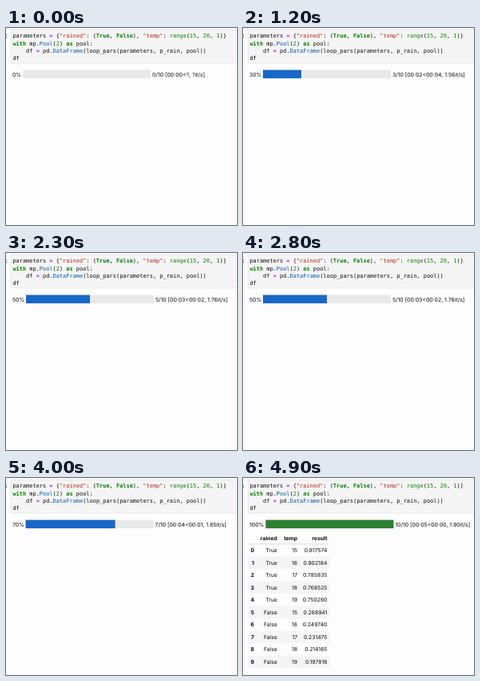
Recreate the animation shown at these times as an HTML page. Size 289 px wide and 247 px high, loop 5000 ms.

```html
<!DOCTYPE html>
<html lang="en">
<head>
<meta charset="utf-8">
<title>Parallel loop with progress bar</title>
<style>
  html, body { margin: 0; width: 100%; height: 100%; overflow: hidden; background: #fdfdfd; }
  svg { display: block; width: 100%; height: 100%; }
  text { white-space: pre; fill: #0c0c0c; text-rendering: geometricPrecision; }
  .code text { font: 6.94px "DejaVu Sans Mono", monospace; }
  .ui { font: 6.9px Inter, sans-serif; }
  .table { font: 6.8px Inter, sans-serif; }
  .b, .k { font-weight: 700; }
  .k, .n { fill: #008000; }
  .s { fill: #ba2121; }
  .p { fill: #0055aa; }
  .o { fill: #aa22ff; font-weight: 700; }
</style>
</head>
<body>
<svg id="stage" viewBox="0 0 289 247" xmlns="http://www.w3.org/2000/svg">
  <rect width="289" height="247" fill="#fdfdfd"/>
  <rect x="6.2" y="2.2" width="290" height="41.8" fill="#f5f5f5" stroke="#dedede" stroke-width=".6"/>
  <g class="code" id="code"><text x="-1.5" y="12.4">:</text></g>
  <g class="ui">
    <text id="percent" x="8" y="60.6"></text>
    <rect id="track" y="52.6" width="160" height="10.5" fill="#e9e9e9"/>
    <rect id="bar" y="52.6" height="10.5"/>
    <text id="stats" y="60.6"></text>
  </g>
  <g class="table" id="table"></g>
</svg>
<script>
const NS = "http://www.w3.org/2000/svg";
const LOOP = 5000;
const $ = id => document.getElementById(id);

function add(parent, tag, attrs, text) {
  const el = document.createElementNS(NS, tag);
  for (const key in attrs) el.setAttribute(key, attrs[key]);
  if (text !== undefined) el.textContent = text;
  return parent.appendChild(el);
}

// Code cell
const source = [
  'parameters = {"rained": (True, False), "temp": range(15, 20, 1)}',
  'with mp.Pool(2) as pool:',
  '    df = pd.DataFrame(loop_pars(parameters, p_rain, pool))',
  'df'
];
const token = /(?<s>"[^"]*")|\b(?<k>with|as|True|False)\b|\b(?<n>range|\d+)\b|(?<o>=)|(?<p>(?<=\.)\w+)|[^"=\w]+|\w+/g;

source.forEach((line, i) => {
  const row = add($("code"), "text", { x: 8.4, y: 12.4 + i * 9.15 });
  for (const m of line.matchAll(token)) {
    const kind = Object.keys(m.groups).find(key => m.groups[key]);
    add(row, "tspan", kind ? { class: kind } : {}, m[0]);
  }
});

// Result table
const results = [.817574, .802184, .785835, .768525, .750260,
                 .268941, .249740, .231475, .214165, .197816];
const COLUMNS = [14, 42.8, 68.1, 105.4];
const LEFT = 6, WIDTH = 103, ROW = 15.53, HEAD = 75.1;
const table = $("table");

function addRow(mid, cells, isBold) {
  cells.forEach((text, i) => add(table, "text", {
    x: COLUMNS[i], y: mid + 2.4, "text-anchor": "end", class: isBold(i) ? "b" : ""
  }, text));
}

add(table, "text", { x: -1.5, y: HEAD + 2.4, style: "fill:#bf5b3d" }, ":");
addRow(HEAD, ["", "rained", "temp", "result"], () => true);
results.forEach((value, i) => {
  const mid = HEAD + (i + 1) * ROW;
  if (i % 2) add(table, "rect", { x: LEFT, y: mid - ROW / 2, width: WIDTH, height: ROW, fill: "#f5f5f5" });
  addRow(mid, [i, i < 5 ? "True" : "False", 15 + i % 5, value.toFixed(6)], col => col === 0);
});
add(table, "rect", { x: LEFT, y: 82.6, width: WIDTH, height: .6, fill: "#bdbdbd" });

// Progress: start time, items done, bar position, timing text
const steps = [
  [0, 0, 21.2, "00:00<?, ?it/s"],
  [200, 1, 24.2, "00:01<00:09, 1.03s/it"],
  [1200, 3, 25, "00:02<00:04, 1.56it/s"],
  [2300, 5, 25, "00:03<00:02, 1.76it/s"],
  [3300, 7, 24.6, "00:04<00:01, 1.85it/s"],
  [4300, 10, 28.4, "00:05<00:00, 1.90it/s"]
];

function render(time) {
  const t = time % LOOP;
  const [, done, x, timing] = steps.filter(s => s[0] <= t).pop();
  const finished = done === 10;
  $("percent").textContent = done * 10 + "%";
  $("track").setAttribute("x", x);
  $("bar").setAttribute("x", x);
  $("bar").setAttribute("width", done * 16);
  $("bar").setAttribute("fill", finished ? "#2d802f" : "#1967c9");
  $("stats").setAttribute("x", x + 161.9);
  $("stats").textContent = `${done}/10 [${timing}]`;
  table.style.display = finished ? "" : "none";
}

const start = performance.now();
function tick() {
  render(performance.now() - start);
  requestAnimationFrame(tick);
}
tick();
</script>
</body>
</html>
```
